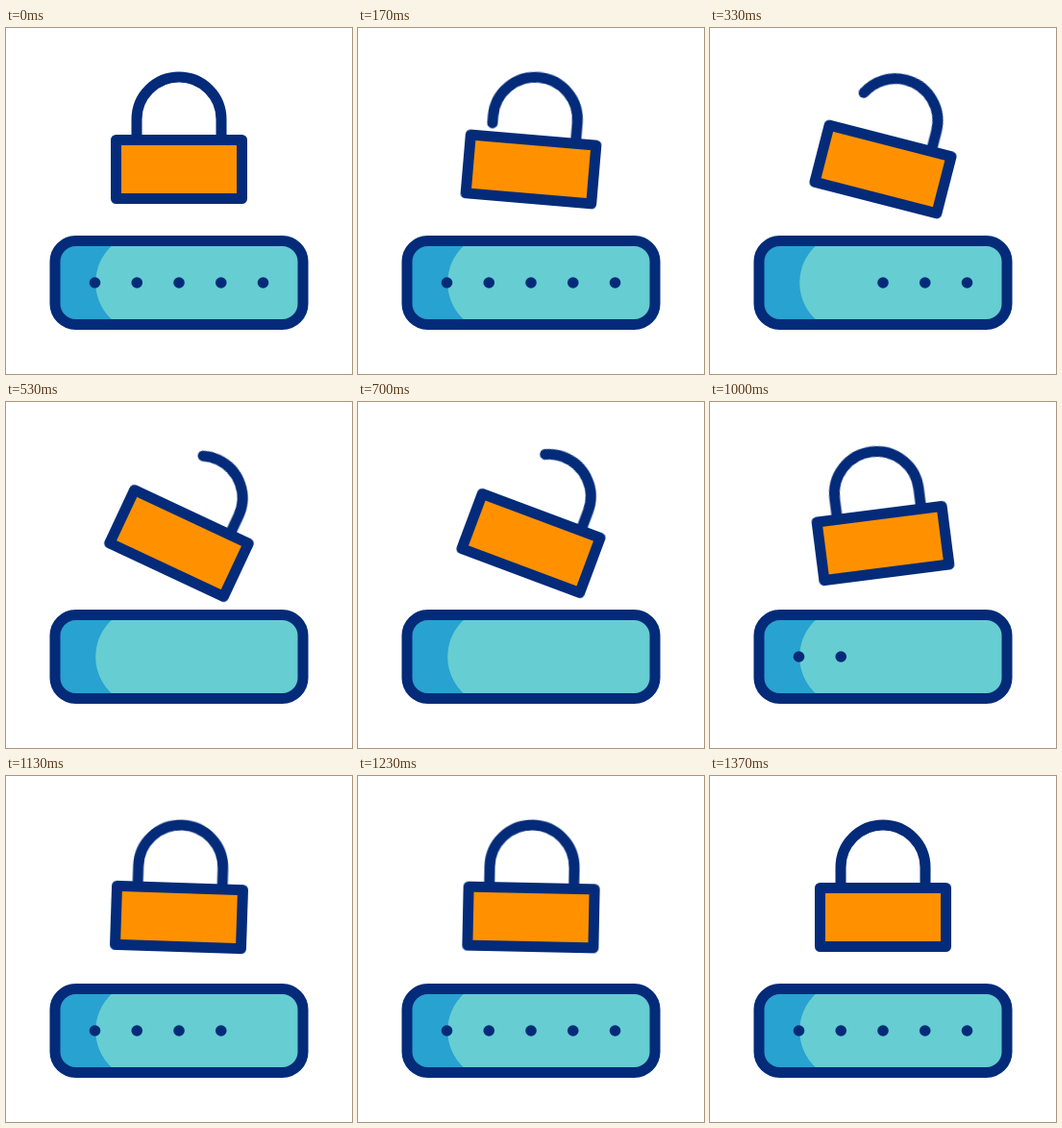
An HTML page for the animation above (2 s loop, 360x360 px).

```html
<!DOCTYPE html>
<html lang="en">
<head>
<meta charset="utf-8">
<title>Padlock and password</title>
<style>
  :root {
    --navy: #032b79;
    --orange: #ff9100;
    --teal: #66cdd2;
    --blue: #28a2d0;
    --loop: 2000ms;
    --ease: cubic-bezier(.333, 0, .667, 1);
  }
  html, body { margin: 0; height: 100%; overflow: hidden; background: #fff; }
  svg { display: block; width: 100%; height: 100%; }

  .line {
    fill: none;
    stroke: var(--navy);
    stroke-width: 11;
    stroke-linecap: round;
    stroke-linejoin: round;
  }
  .body { fill: var(--orange); }

  .lock {
    transform-origin: 180px 147px;
    animation: swing var(--loop) var(--ease) infinite;
  }
  .shackle {
    stroke-dasharray: 181.2 300;
    animation: open var(--loop) var(--ease) infinite;
  }
  .dots circle {
    fill: var(--navy);
    animation: blink var(--loop) step-end calc(var(--i) * 66.667ms) infinite;
  }

  @keyframes swing {
    0%, 68.333%, 100% { transform: rotate(0deg); }
    31.667% { transform: rotate(27deg); }
    45% { transform: rotate(-13.4deg); }
    56.667% { transform: rotate(1.9deg); }
  }
  @keyframes open {
    0%, 48.333%, 100% { stroke-dashoffset: 0; }
    31.667% { stroke-dashoffset: 80; }
  }
  @keyframes blink {
    0%, 46.5% { opacity: 1; }
    11.5% { opacity: 0; }
    100% { opacity: 1; }
  }
</style>
</head>
<body>
<svg viewBox="0 0 360 360">
  <g class="lock">
    <path class="line shackle" d="M224 116.5V95a44 44 0 0 0-88 0v21.5"/>
    <rect class="line body" x="114.5" y="116.5" width="131" height="61"/>
  </g>

  <clipPath id="field"><rect x="51" y="221.5" width="258" height="87" rx="21.5"/></clipPath>
  <g clip-path="url(#field)">
    <rect x="51" y="221" width="258" height="88" fill="var(--teal)"/>
    <path d="M51 221H117.5A52 52 0 0 0 117.5 309H51z" fill="var(--blue)"/>
  </g>
  <rect class="line" x="51" y="221.5" width="258" height="87" rx="21.5"/>

  <g class="dots">
    <circle cx="92.5" cy="265" r="5.8" style="--i:0"/>
    <circle cx="136.25" cy="265" r="5.8" style="--i:1"/>
    <circle cx="180" cy="265" r="5.8" style="--i:2"/>
    <circle cx="223.75" cy="265" r="5.8" style="--i:3"/>
    <circle cx="267.5" cy="265" r="5.8" style="--i:4"/>
  </g>
</svg>
</body>
</html>
```
